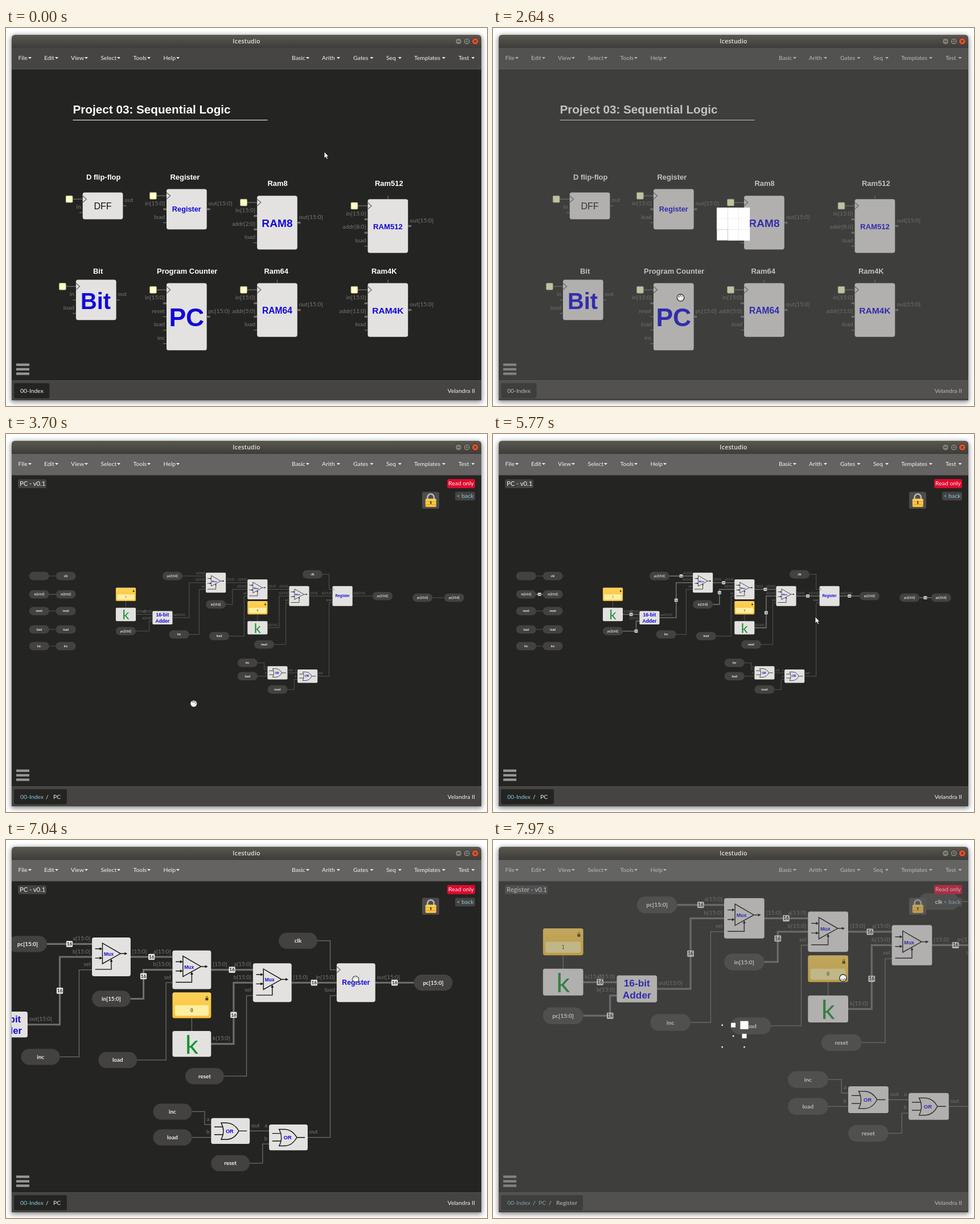
An HTML page for the animation above (8000 ms loop, 845 by 663 pixels).

```html
<!DOCTYPE html>
<html lang="en">
<head>
<meta charset="utf-8">
<title>Sequential logic editor</title>
<style>
  html, body { margin: 0; width: 100%; height: 100%; overflow: hidden; background: #fff; }
  .window { position: absolute; left: 10px; top: 12px; width: 825px; height: 641px;
    border-radius: 6px 6px 0 0; box-shadow: 0 2px 9px 1px rgba(0,0,0,.5); }
  svg { position: absolute; left: 0; top: 0; display: block; }
  text { font-family: Lato, sans-serif; white-space: pre; }
  .sans { font-family: "Liberation Sans", Arial, sans-serif; }
  .bold { font-weight: 700; }
  .mid { text-anchor: middle; }
  .end { text-anchor: end; }
  .ui { font-size: 10.4px; fill: #f2f2f1; }
  .link { fill: #86c9de; }
  .port { font-size: 14px; fill: #777675; }
  .wire, .bus { fill: none; stroke: #6f6e6d; stroke-width: 1.8; }
  .bus { stroke-width: 4.4; }
  .plain .bus { stroke-width: 1.8; }
  .plain .size { display: none; }
  .gate { fill: none; stroke: #111; stroke-width: 2; }
</style>
</head>
<body>
<script>
const LOOP = 8000;
const BLUE = '#1208d8';

// ---- drawing helpers ----
const rect = (x, y, w, h, fill, r = 0, more = '') =>
  `<rect x="${x}" y="${y}" width="${w}" height="${h}" rx="${r}" fill="${fill}" ${more}/>`;
const text = (x, y, s, cls = 'ui', more = '') =>
  `<text x="${x}" y="${y}" class="${cls}" ${more}>${s}</text>`;
const line = (d, cls = 'wire') => `<path d="${d}" class="${cls}"/>`;
const shape = (d, fill, more = '') => `<path d="${d}" fill="${fill}" ${more}/>`;
const group = (id, body, more = '') => `<g id="${id}" ${more}>${body}</g>`;
const centred = (x, y, s, size, fill = BLUE, cls = 'sans bold mid') =>
  text(x, y + size * .36, s, cls, `font-size="${size}" fill="${fill}"`);

const kind = name => name.includes('[') ? 'bus' : 'wire';

function block(x, y, h, left, right, body = '', stubs = false) {
  let s = rect(x, y, 96, h, '#e3e2e0', 5);
  left.forEach((name, i) => {
    const py = y + 16 + 32 * i;
    if (name === '>') {
      s += line(`M${x} ${py - 8}l9 8l-9 8`);
      if (stubs) s += line(`M${x - 24} ${py}H${x}`) +
        rect(x - 40, py - 8, 16, 16, '#ffffc6', 2, 'stroke="#aeae8c"');
      return;
    }
    if (stubs) s += line(`M${x - 8} ${py}h8`, kind(name));
    s += text(x - 4, py - 9, name, 'port end');
  });
  if (right) {
    const py = y + h / 2;
    if (stubs) s += line(`M${x + 96} ${py}h8`, kind(right));
    s += text(x + 100, py - 9, right, 'port');
  }
  return s + `<g transform="translate(${x} ${y})">${body}</g>`;
}

const pill = (x, cy, name) => rect(x, cy - 20, 96, 40, '#434241', 20) +
  text(x + 48, cy + 5, name, 'bold mid', 'font-size="14" fill="#f0efee"');

function wire(x1, y1, x2, y2, xm = (x1 + x2) / 2) {
  return line(`M${x1} ${y1}H${xm}V${y2}H${x2}`);
}

function bus(x1, y1, x2, y2, xm = (x1 + x2) / 2) {
  const run = Math.abs(xm - x1), rise = Math.abs(y2 - y1);
  const half = (run + rise + Math.abs(x2 - xm)) / 2;
  const my = y1 + Math.sign(y2 - y1) * (half - run);
  return line(`M${x1} ${y1}H${xm}V${y2}H${x2}`, 'bus') +
    `<g class="size">${rect(xm - 8, my - 7.5, 16, 15, '#e6e5e3', 2)}` +
    text(xm, my + 4, '16', 'bold mid', 'font-size="11.5" fill="#222"') + '</g>';
}

// ---- circuit parts ----
const muxBody = line('M26 14V65L71 40ZM8 28H20M8 51H20M71 40H82M8 79H48V59', 'gate') +
  shape('M26 28l-7-3.5v7zM26 51l-7-3.5v7zM88 40l-7-3.5v7zM48 53l-3.5 7h7z', '#111') +
  centred(41.5, 41, 'Mux', 12);
const mux = (x, y) => block(x, y, 96, ['a[15:0]', 'b[15:0]', 'sel'], '[15:0]', muxBody);

const orBody = line('M25 12H40Q58 13 69 32Q58 52 40 53H25Q36 32 25 12ZM8 22H29M8 41H29M69 32H89', 'gate') +
  centred(46, 32, 'OR', 13);
const or = (x, y) => block(x, y, 64, ['a', 'b'], 'out', orBody);

function constant(x, y, value) {
  return line(`M${x + 48} ${y + 64}v32`) +
    rect(x, y, 96, 64, 'url(#gold)', 5) + rect(x + 6, y + 32, 84, 26, '#fdeea2', 4) +
    text(x + 48, y + 49, value, 'mid', 'font-size="12" fill="#333" style="font-family:\'DejaVu Sans Mono\',monospace"') +
    rect(x + 82, y + 14, 7, 6, '#4a3a08', 1) +
    shape(`M${x + 83.5} ${y + 14}v-2a2 2 0 0 1 4 0v2`, 'none', 'stroke="#4a3a08" stroke-width="1.2"') +
    block(x, y + 96, 64, [], 'k[15:0]', text(48, 56, 'k', 'mid', 'font-size="64" fill="#15912f"'));
}

function pcGraph() {
  const wires =
    bus(-112, 16, 0, 16) + bus(-160, 216, 0, 48, -80) + bus(-336, 200, -256, 200) +
    bus(-336, 280, -256, 232, -272) + bus(96, 48, 200, 48) + bus(96, 152, 200, 80, 128) +
    bus(296, 264, 400, 112, 352) + bus(296, 80, 400, 80) + bus(496, 112, 608, 112) +
    bus(704, 112, 800, 112) + bus(-752, 104, -720, 104) + bus(1088, 120, 1144, 120) +
    wire(-80, 296, 0, 80, -32) + wire(112, 304, 200, 112, 184) + wire(328, 344, 400, 144, 384) +
    wire(560, 8, 608, 80, 592) + wire(536, 496, 608, 144, 592) + wire(248, 432, 296, 464, 280) +
    wire(248, 496, 296, 496) + wire(392, 480, 440, 480) + wire(392, 560, 440, 512, 424);
  const rows = [['', 'clk', 16], ['in[15:0]', 'in[15:0]', 104], ['reset', 'reset', 184],
    ['load', 'load', 272], ['inc', 'inc', 352]];
  const table = rows.map(([a, b, y]) =>
    wire(-752, y, -720, y) + pill(-848, y, a) + pill(-720, y, b)).join('');
  const pills = [[-208, 16, 'pc[15:0]'], [-432, 280, 'pc[15:0]'], [-176, 296, 'inc'],
    [0, 152, 'in[15:0]'], [16, 304, 'load'], [232, 344, 'reset'], [152, 432, 'inc'],
    [152, 496, 'load'], [296, 560, 'reset'], [464, 8, 'clk'], [800, 112, 'pc[15:0]'],
    [992, 120, 'pc[15:0]'], [1144, 120, 'pc[15:0]']].map(p => pill(...p)).join('');
  const adder = centred(48, 18, '16-bit', 23.5) + centred(48, 47, 'Adder', 23.5);
  return table + wires + pills +
    constant(-432, 72, '1') + constant(200, 136, '0') +
    block(-256, 184, 64, ['a[15:0]', 'b[15:0]'], 'out[15:0]', adder) +
    mux(0, 0) + mux(200, 32) + mux(400, 64) + or(296, 448) + or(440, 464) +
    block(608, 64, 96, ['>', 'in[15:0]', 'load'], 'out[15:0]', centred(48, 47, 'Register', 17.3));
}

function homeGraph() {
  const ram = (x, y, name, size, bits, top = true) =>
    (top ? line(`M${x + 48} ${y - 8}v8`) : '') +
    block(x, y, 128, ['>', 'in[15:0]', `addr[${bits}:0]`, 'load'], 'out[15:0]', centred(48, 65, name, size), true);
  const parts =
    block(-200, 8, 64, ['>', 'in'], 'out', centred(48, 32.5, 'DFF', 21.8, '#111', 'sans mid'), true) +
    block(0, 0, 96, ['>', 'in[15:0]', 'load'], 'out[15:0]', centred(48, 47, 'Register', 17.3), true) +
    block(-216, 216, 96, ['>', 'in', 'load'], 'out', centred(47, 51, 'Bit', 54), true) +
    block(0, 224, 160, ['>', 'in[15:0]', 'reset', 'load', 'inc'], 'pc[15:0]', centred(48, 81, 'PC', 60.5), true) +
    ram(216, 16, 'RAM8', 26, 2, false) + ram(480, 24, 'RAM512', 17.9, 8) +
    ram(216, 224, 'RAM64', 21.2, 5) + ram(480, 224, 'RAM4K', 21.1, 11);
  const titles = [['D flip-flop', 141, 265.5], ['Register', 288.5, 265.5], ['Ram8', 459.5, 277],
    ['Ram512', 648, 277], ['Bit', 153, 430.5], ['Program Counter', 265, 430.5],
    ['Ram64', 453.5, 430.5], ['Ram4K', 642, 430.5]]
    .map(([s, x, y]) => text(x, y, s, 'sans bold', 'font-size="12.95" fill="#fff"')).join('');
  return `<g transform="translate(282 282.5) scale(.7365)">${parts}</g>` + titles +
    text(117.5, 150, 'Project 03: Sequential Logic', 'sans bold', 'font-size="20.7" fill="#fff"') +
    rect(117.5, 161, 342, 1, '#fff');
}

// ---- window frame ----
function chrome() {
  const menus = [['File', 21.5, 39], ['Edit', 67, 86], ['View', 114, 138], ['Select', 166.5, 195],
    ['Tools', 223.5, 248], ['Help', 276.5, 299], ['Basic', 502, 527], ['Arith', 555, 581],
    ['Gates', 610, 639.5], ['Seq', 668, 689], ['Templates', 717, 766], ['Test', 795, 817.5]]
    .map(([s, x, c]) => text(x, 56, s) + shape(`M${c} 51h6l-3 3.3z`, '#f2f2f1')).join('');
  const bars = [588.5, 596.5, 604.3].map(y => rect(18, y, 23, 4.2, '#999896')).join('');
  return rect(10, 35, 825, 37, '#464544', 0, 'id="nav"') + rect(10, 71.5, 825, 1, '#5b5a58') + menus +
    bars + rect(10, 618, 825, 35, '#454443') + rect(10, 618, 825, 1, '#575654') +
    text(824, 639.5, 'Velandra II', 'ui end');
}

function titleBar() {
  const button = (x, fill, mark) => `<circle cx="${x}" cy="23.3" r="5.9" fill="${fill}" stroke="#34332f"/>` +
    shape(mark, 'none', 'stroke="#3a3934" stroke-width="1.1"');
  return shape('M10 35V18Q10 12 16 12H829Q835 12 835 18V35Z', 'url(#bar)') +
    text(422.5, 27.3, 'Icestudio', 'mid', 'font-size="10.6" font-weight="600" letter-spacing=".2" fill="#e6e3dc" style="font-family:\'Open Sans\',sans-serif"') +
    button(795, '#7d7c75', 'M792 23.3h6') + button(809.7, '#7d7c75', 'M807.5 21.2h4.4v4.2h-4.4z') +
    button(824.3, '#e7522b', 'M822.2 21.2l4.2 4.2m0-4.2l-4.2 4.2');
}

function readOnly() {
  return rect(731, 101.5, 30, 29.5, '#4d4c4a', 3) +
    shape('M740.5 115v-4a5.7 5.7 0 0 1 11.4 0v4', 'none', 'stroke="#b9b8b6" stroke-width="2.6"') +
    rect(736.8, 113.5, 19, 14.5, 'url(#gold)', 2) + rect(737.5, 118, 17.6, 1, '#d99a2c') +
    rect(737.5, 123, 17.6, 1, '#d99a2c') + rect(745.3, 117.5, 2, 5.5, '#4b350c', 1) +
    rect(775, 79, 49, 16, '#e0082d', 3) + text(799.5, 90.3, 'Read only', 'ui mid') +
    rect(789, 101.5, 35, 15, '#444342', 3) + text(806.5, 112, '&lt; back', 'ui mid link');
}

const badge = (w, s) => rect(21, 79.5, w, 15.5, '#444342', 3) +
  text(24, 90.5, s, 'ui', 'style="font-size:11.2px"');
const tab = (w, items) => rect(14, 623, w, 26.5, '#242422', 3) +
  items.map(([x, s, cls]) => text(x, 639.5, s, cls)).join('');

const levels = [
  tab(62.5, [[25, '00-Index', 'ui']]),
  badge(50, 'PC - v0.1') + readOnly() +
    tab(93, [[25, '00-Index', 'ui link'], [70, '/', 'ui'], [83, 'PC', 'ui']]),
  badge(75, 'Register - v0.1') + readOnly() +
    tab(144, [[25, '00-Index', 'ui link'], [70, '/', 'ui'], [80, 'PC', 'ui link'], [98, '/', 'ui'], [111, 'Register', 'ui']]),
];

const cursors = group('arrow', shape('M0 0V11.5L2.7 9.2L4.6 13.3L6.6 12.4L4.8 8.5H8.2Z', '#fff', 'stroke="#111" stroke-width=".9"')) +
  group('hand', shape('M-4.5 -1Q-4.5 -4.6 -2 -4Q-.6 -5.8 1 -4.3Q3 -5.2 3.8 -3.2Q6 -3 5.8 0Q5.6 3 4 5.3H-3Q-3.6 3 -5.8 1.6Q-6.4 -1 -4.5 -1Z',
    '#fff', 'stroke="#111" stroke-width="1"') + shape('M-2 -3v2M1 -3.3v2.2M3.6 -2.4v1.6', 'none', 'stroke="#333" stroke-width=".7"')) +
  group('busy', '<circle r="6.2" fill="#f4f4f2" stroke="#1a1a1a" stroke-width="1.2"/>' +
    '<g id="dots" fill="#222"><circle cx="-2.9" cy="-2" r=".9"/><circle cx="-.3" cy="-3.5" r=".9"/><circle cx="2.5" cy="-2.4" r=".8"/></g>');

const cubes = Array.from({ length: 9 }, (_, i) => rect(0, 0, 0, 0, '#fff', 0, `class="cube" data-i="${i}"`)).join('');

document.body.innerHTML = `<div class="window"></div>
<svg width="845" height="663" viewBox="0 0 845 663">
<defs>
  <linearGradient id="bar" x2="0" y2="1"><stop stop-color="#5a5850"/><stop offset="1" stop-color="#3d3c38"/></linearGradient>
  <linearGradient id="gold" x2="0" y2="1"><stop stop-color="#fdd25a"/><stop offset="1" stop-color="#f7c136"/></linearGradient>
  <clipPath id="view"><rect x="10" y="72" width="825" height="546"/></clipPath>
</defs>
${rect(10, 35, 825, 618, '#242422')}
<g clip-path="url(#view)">${group('home', homeGraph())}${group('pc', pcGraph())}</g>
${chrome()}${levels.map((s, i) => group('level' + i, s)).join('')}
${group('wait', rect(10, 35, 825, 615, '#646464', 0, 'opacity=".4"') + cubes)}
${titleBar()}${group('cursor', cursors)}
</svg>`;

// ---- motion ----
const $ = id => document.getElementById(id);
const show = (id, on) => { $(id).style.display = on ? '' : 'none'; };
const cubeNodes = [...document.querySelectorAll('.cube')];

// time, x, y of the pointer; straight moves between rows
const path = [
  [0, 559, 217], [440, 559, 217], [500, 554, 217], [640, 554, 217], [700, 549, 217],
  [900, 549, 217], [1170, 455, 217], [1300, 455, 217], [1370, 441.5, 221], [1570, 415, 299],
  [1700, 415, 299], [2170, 331, 472], [2300, 331, 472], [2370, 329.5, 473], [4770, 330, 473],
  [5100, 512.5, 383.5], [5170, 512.5, 383.5], [5300, 536.5, 321.5], [5370, 536.5, 321.5],
  [5640, 566, 320.5], [6500, 566, 320.5], [6570, 632, 288], [6640, 717, 256], [6700, 684, 241],
  [6770, 628, 248], [6900, 628, 248], [7040, 614, 243.5], [7370, 614, 243.5], [7440, 615, 242],
];

function pointer(q) {
  const i = path.findIndex(p => p[0] > q);
  if (i < 0) return path[path.length - 1].slice(1);
  if (i === 0) return path[0].slice(1);
  const [a, b] = [path[i - 1], path[i]];
  const f = (q - a[0]) / (b[0] - a[0]);
  return [a[1] + (b[1] - a[1]) * f, a[2] + (b[2] - a[2]) * f];
}

function pointerKind(q) {
  if (q >= 7440 || (q >= 2370 && q < 3770)) return 'busy';
  return q >= 6770 || (q >= 2100 && q < 2370) ? 'hand' : 'arrow';
}

const ease = x => x * x * (3 - 2 * x);

function cubeScale(t) {
  const p = t < 0 ? 0 : t % 1300 / 455;
  return p < 1 ? 1 - ease(p) : p < 2 ? ease(p - 1) : 1;
}

function spin(t) {
  cubeNodes.forEach((node, i) => {
    const c = i % 3, r = Math.floor(i / 3);
    const size = 19.5 * cubeScale(t - (2 - r + c) * 100);
    node.setAttribute('x', 402.7 + 19.4 * c - size / 2);
    node.setAttribute('y', 324.7 + 19.2 * r - size / 2);
    node.setAttribute('width', size);
    node.setAttribute('height', size);
  });
}

function view(q, level) {
  if (level === 2) return [406, 102, .7365];
  const s = q < 5840 ? .366 : q < 5900 ? .46 : q < 5970 ? .58 : .707;
  return [565.7 - 586.5 * s, 320.7 - 211.7 * s, s];
}

function draw(t) {
  // the screen refreshes 15 times a second
  const q = 10 * Math.ceil((2 * Math.floor((t * .03 - 1) / 2) + 1) * 10 / 3 - .01);
  const level = q < 2840 ? 0 : q < 7570 ? 1 : 2;
  const inside = q >= 3500;
  const waiting = (q >= 2640 && q < 3570) || q >= 7440;

  show('home', !inside);
  show('pc', inside);
  for (let i = 0; i < 3; i++) show('level' + i, i === level);
  $('nav').setAttribute('fill', level ? '#646362' : '#464544');
  $('pc').setAttribute('class', q < 3770 ? 'plain' : '');
  const [x, y, s] = view(q, level);
  $('pc').setAttribute('transform', `translate(${x} ${y}) scale(${s})`);

  show('wait', waiting);
  if (waiting) spin(q < 7000 ? Math.min(q, 3370) - 2590 : q - 7415);

  const mode = pointerKind(q);
  for (const id of ['arrow', 'hand', 'busy']) show(id, id === mode);
  $('cursor').setAttribute('transform', `translate(${pointer(q)})`);
  $('dots').setAttribute('transform', `rotate(${(q - 2640) / 970 * 360})`);
}

const start = performance.now();
function tick() {
  draw((performance.now() - start) % LOOP);
  requestAnimationFrame(tick);
}
tick();
</script>
</body>
</html>
```
